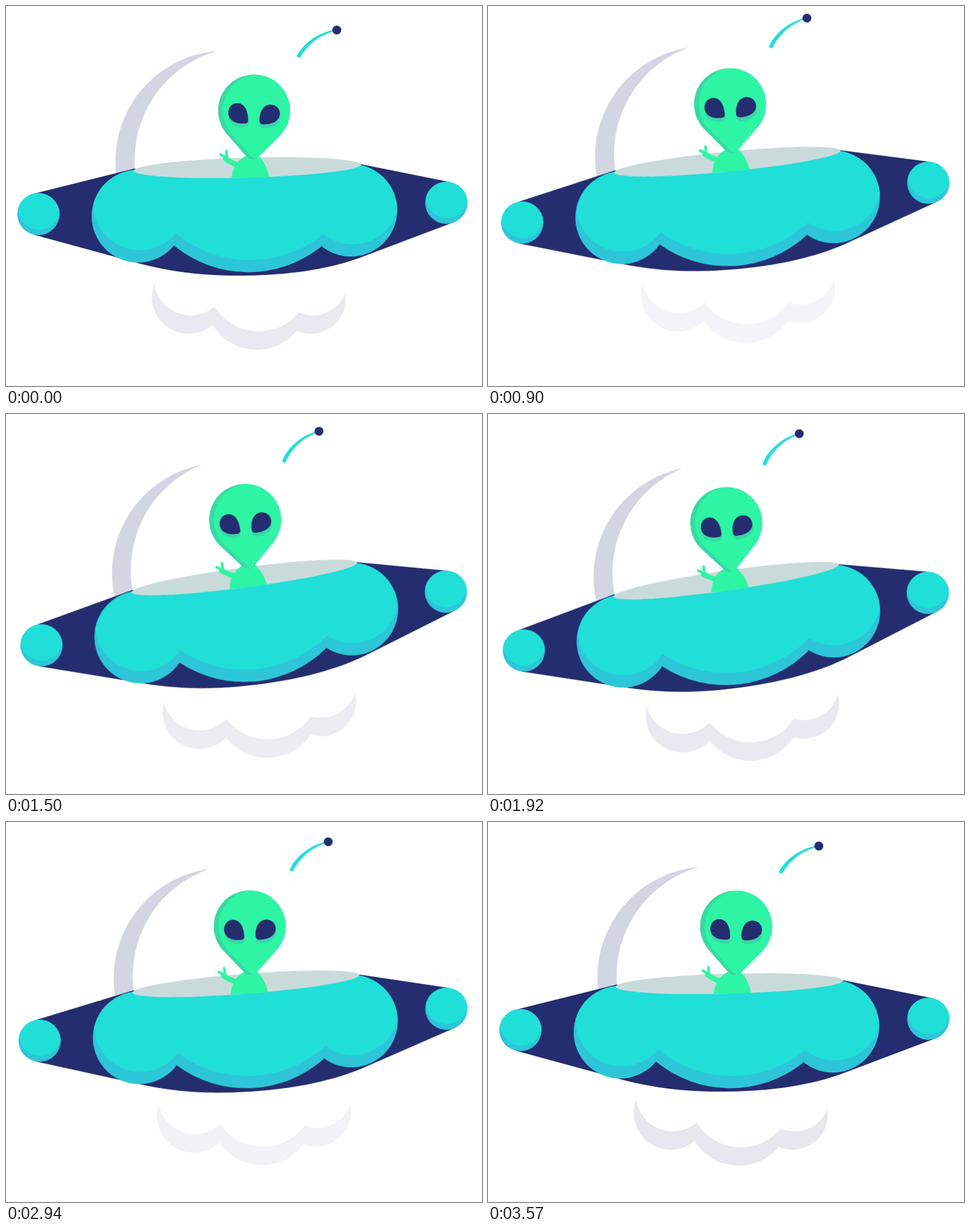
Animation, 800 px wide and 640 px high, one loop 3.6 s. Source, as an HTML page:

```html
<!DOCTYPE html>
<html lang="en">
<head>
<meta charset="utf-8">
<title>Flying saucer</title>
<style>
  html, body { margin: 0; width: 100%; height: 100%; overflow: hidden; background: #fff; }
  svg { display: block; width: 800px; height: 640px; }

  .navy  { fill: #242d70; }
  .teal  { fill: #20dfd8; }
  .deep  { fill: #2dc6d9; }
  .green { fill: #2df5a4; }
  .moss  { fill: #37d9a4; }

  #ship {
    transform-origin: 397.25px 341px;
    animation: hover 3.6s linear infinite;
  }
  #puff { animation: pulse 3.6s linear infinite; }

  @keyframes hover {
    0%     { transform: translate(0px, 0px) rotate(0deg); }
    25%    { transform: translate(1.5px, -9.75px) rotate(-4.02deg); }
    50%    { transform: translate(2.6px, 10.1px) rotate(-6.94deg); }
    75%    { transform: translate(1.5px, .7px) rotate(-4.03deg); }
    99.17%, 100% { transform: translate(0px, 0px) rotate(0deg); }
  }
  @keyframes pulse {
    0%     { opacity: .104; }
    25%    { opacity: .058; }
    50%    { opacity: .11; }
    75%    { opacity: .056; }
    99.17%, 100% { opacity: .104; }
  }
</style>
</head>
<body>
<svg viewBox="0 0 800 640" xmlns="http://www.w3.org/2000/svg">
  <defs>
    <g id="cloud">
      <circle cx="307" cy="490" r="62"/>
      <circle cx="421.5" cy="492" r="87"/>
      <circle cx="512" cy="493" r="59"/>
    </g>
    <path id="lobes" d="M144 354a78 78 0 1 0 156 0a78 78 0 1 0 -156 0z
      M501.5 344a78 78 0 1 0 156 0a78 78 0 1 0 -156 0z
      M214.5 277L283 404A196 196 0 0 0 529 406L597 267z"/>
    <circle id="ball" r="35.5"/>
    <path id="head" d="M371.6 216A60.5 60.5 0 1 1 460 218.5L425.5 253C420 260 408 260 402 251z"/>
    <g id="eyes">
      <path d="M407 192Q407 198 401 198C385 199 374 192 373.5 180C374 169 381 163.5 389 163.5C402 164 407 178 407 192z"/>
      <path d="M426 192Q425.5 199.5 433 199.5C450 199 460 193 460.5 181C460 171 452 166 444 166C431 167 426 180 426 192z"/>
    </g>
    <clipPath id="inLobes"><use href="#lobes"/></clipPath>
    <clipPath id="inBall"><use href="#ball"/></clipPath>
    <clipPath id="inHead"><use href="#head"/></clipPath>
    <g id="pod">
      <use href="#ball" class="deep"/>
      <g clip-path="url(#inBall)"><use href="#ball" class="teal" transform="translate(1.5 -9.5)"/></g>
    </g>
  </defs>

  <g id="ship">
    <!-- exhaust -->
    <g id="puff" class="navy"><use href="#cloud"/></g>
    <use href="#cloud" fill="#fff" transform="translate(3.5 -31)"/>

    <!-- dome and antenna -->
    <path class="navy" opacity=".2" d="M185 281A186 186 0 0 1 354 76A190.5 190.5 0 0 0 217 277L217 284L186 284z"/>
    <path class="teal" d="M488.5 85C499 63 524 45 552 40L552 42.5C528 49 508 63 494 87.5z"/>
    <circle class="navy" cx="556" cy="40.5" r="7.5"/>

    <!-- hull -->
    <path class="navy" d="M47 316L215 274L597 266.5L746 296.5L752 364.5L600 422
      C545 443 480 453 400 454C340 455 280 449 218 432L46 385z"/>
    <use href="#pod" transform="translate(54.5 350.5)"/>
    <use href="#pod" transform="translate(740 331.5)"/>
    <use href="#lobes" class="deep"/>
    <g clip-path="url(#inLobes)"><use href="#lobes" class="teal" transform="translate(3 -20.5)"/></g>
    <ellipse cx="405.5" cy="272.3" rx="191" ry="16.8" fill="#c8dbda" transform="rotate(-1.55 405.5 272.3)"/>

    <!-- pilot -->
    <path class="green" d="M379 289.3C381 270 392 258 402 253L425 253C434 262 440 275 442 288.2Q411 289.6 379 289.3z"/>
    <g fill="none" stroke="#2df5a4" stroke-linecap="round">
      <path stroke-width="9" d="M369 257Q378 264 391 269"/>
      <path stroke-width="4.4" d="M361 250.3L369 255M370.6 244.5L371 255"/>
    </g>
    <use href="#head" class="moss"/>
    <g clip-path="url(#inHead)"><use href="#head" class="green" transform="translate(8 0)"/></g>
    <use href="#eyes" class="moss" transform="translate(.5 6.5)"/>
    <use href="#eyes" class="navy"/>
  </g>
</svg>
</body>
</html>
```
